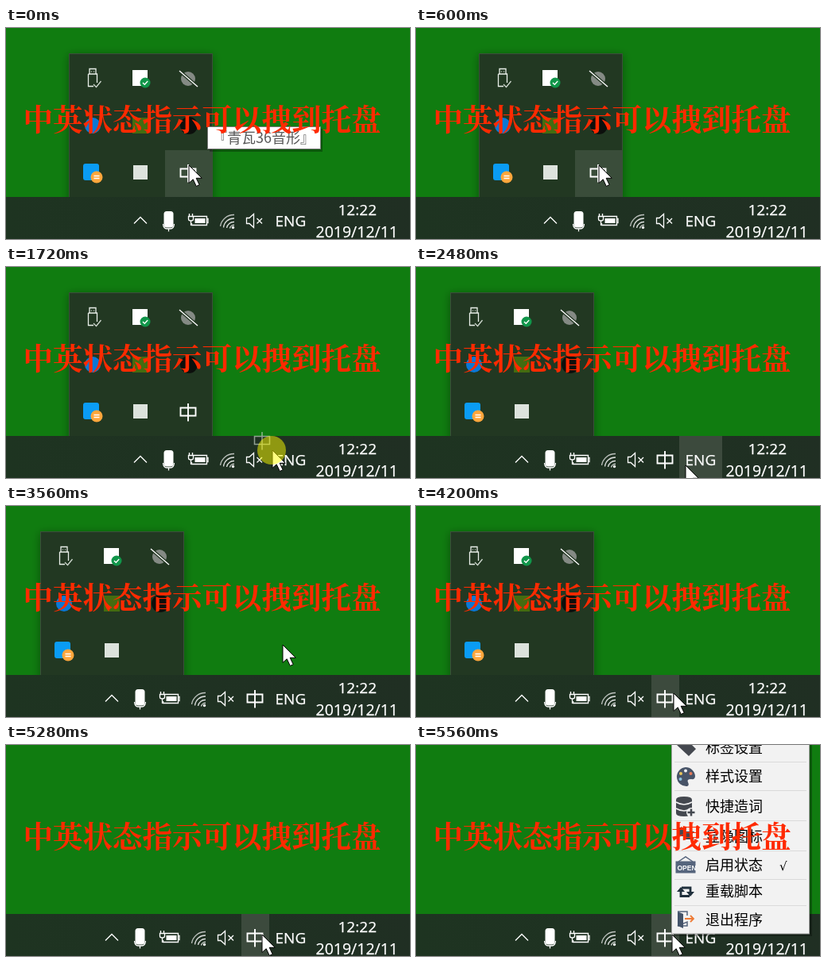
Recreate the animation shown at these times as an HTML page. Size 508 by 266 pixels, loop 6280 ms.

```html
<!DOCTYPE html>
<html lang="zh-CN">
<head>
<meta charset="utf-8">
<title>托盘状态指示</title>
<style>
html, body { margin: 0; width: 100%; height: 100%; overflow: hidden; background: #107c10; }
svg { display: block; width: 508px; height: 266px; }
.ui { font: 19.5px "Open Sans", "Noto Sans", sans-serif; fill: #fff; stroke: #fff; stroke-width: .25; }
.cjk { font: 18px "Noto Sans CJK SC", "Noto Sans CJK", sans-serif; }
.title { font: 700 37.5px "Noto Serif CJK SC", "Noto Serif SC", "Noto Sans CJK SC", "Noto Sans CJK", serif; fill: #ff2a00; }
.line { fill: none; stroke: #fff; stroke-width: 1.3; }
</style>
</head>
<body>
<svg viewBox="0 0 508 266">
  <defs>
    <path id="zhong" d="M-9.500 -5.500H9.500V4.500H-9.500ZM0 -11V11.500" fill="none"/>
    <linearGradient id="bar" x2="1" y2="0">
      <stop offset="0" stop-color="#1e3421"/>
      <stop offset="1" stop-color="#202f23"/>
    </linearGradient>
    <filter id="shadow" x="-20%" y="-20%" width="140%" height="140%">
      <feDropShadow dx="0" dy="2" stdDeviation="6" flood-opacity=".35"/>
    </filter>
    <g id="tip">
      <rect x="3" y="3" width="142" height="29" fill="#000" opacity=".3"/>
      <rect x=".5" y=".5" width="142" height="28" fill="#fff" stroke="#777"/>
      <text class="cjk" x="7" y="21" fill="#575757">『青瓦36音形』</text>
    </g>
  </defs>

  <rect width="508" height="266" fill="#107c10"/>

  <g id="panel">
    <rect x="79.5" y="32.5" width="180" height="190" fill="#243824" stroke="#3b503b" filter="url(#shadow)"/>
    <rect id="cell" x="200" y="154" width="59" height="59" fill="#3a4d3a"/>
    <!-- usb stick -->
    <g class="line">
      <path d="M105 58V51.500H113V58M103.500 58H114.500V69M103.500 58V73.500H110" stroke="#e8eee8"/>
      <path d="M107.500 54.500V55.500M110.500 54.500V55.500" stroke="#e8eee8"/>
      <path d="M110 71L113.500 74.500L119.500 67" stroke="#cfd8cf"/>
    </g>
    <rect x="159" y="53" width="19" height="20" fill="#fff"/>
    <circle cx="175" cy="69" r="6.500" fill="#11964a"/>
    <path class="line" d="M172 69L174.300 71.300L178.200 67"/>
    <circle cx="229" cy="64" r="9" fill="#848a84"/>
    <path d="M218 54L241 74" stroke="#243824" stroke-width="4"/>
    <path class="line" d="M218 54L241 74"/>
    <circle cx="109" cy="123" r="10" fill="#0a78d7"/>
    <rect x="159" y="113" width="20" height="20" fill="#446c10"/>
    <circle cx="230" cy="123" r="11" fill="#0c0f0c"/>
    <rect x="97" y="171" width="20" height="21" rx="3" fill="#0a9cf5"/>
    <circle cx="114" cy="188" r="7.500" fill="#ffa63c"/>
    <path class="line" d="M110.500 186.500H117.500M110.500 189.500H117.500"/>
    <rect x="160" y="173" width="18" height="18" fill="#dde3dd"/>
    <use id="hidden" href="#zhong" x="229" y="183" stroke="#fff" stroke-width="1.900"/>
    <path id="mark" d="M200 154V212M198 153.500H202M198 212.500H202" stroke="#107c10" stroke-width="1.600"/>
  </g>

  <rect y="213" width="508" height="53" fill="url(#bar)"/>
  <g id="hover"><rect id="hoverBox" y="213" height="53" fill="#3c4a3d"/></g>

  <g id="tray">
    <path class="line" d="M161 246.500L169 238.500L177 246.500" stroke-width="1.500"/>
    <rect x="198.500" y="231" width="12" height="20.500" rx="3.500" fill="#fff"/>
    <path class="line" d="M197.500 247Q198 253 202 253H207Q211 253 211.500 247M204.500 253V256.500"/>
    <g class="line">
      <path d="M236 237.500H252.500V248.500H233.500V246"/>
      <path d="M252.500 240.500H254V245.500H252.500"/>
      <path d="M230.500 234V237M234.500 234V237M229.500 237.500H235.500V241Q235.500 243 232.500 243T229.500 241ZM232.500 243V249"/>
      <rect x="237.500" y="240" width="13" height="6" fill="#fff" stroke="none"/>
    </g>
    <g class="line" stroke-opacity=".85">
      <path d="M269.500 250A17 17 0 0 1 287 235.500" stroke-opacity=".7"/>
      <path d="M273.500 251.500A13 13 0 0 1 287 240"/>
      <path d="M277.500 252A9 9 0 0 1 287 244.500"/>
      <path d="M281.500 252.500A5 5 0 0 1 287 248.500"/>
    </g>
    <circle cx="285.500" cy="251.500" r="1.700" fill="#fff"/>
    <path class="line" d="M302.500 239.500H306L311.500 234.500V251.500L306 246.500H302.500ZM315.500 240L322 246.500M322 240L315.500 246.500"/>
  </g>
  <use id="shown" href="#zhong" x="313" y="243" stroke="#fff" stroke-width="1.900"/>

  <g class="ui">
    <text x="338.500" y="250" style="font-size:19px">ENG</text>
    <text x="417.500" y="236" style="font-size:19px">12:22</text>
    <text x="389.500" y="264">2019/12/11</text>
  </g>

  <use id="tip1" href="#tip" x="253" y="124"/>
  <use id="tip2" href="#tip" x="321" y="209"/>

  <g id="menu">
    <rect x="324" y="-2" width="174" height="243" fill="#000" opacity=".3"/>
    <rect x="321.500" y="-2" width="173" height="240" fill="#f2f2f2" stroke="#a0a0a0"/>
    <g id="items" class="cjk" fill="#000"></g>
    <text x="457" y="158" font-family="DejaVu Sans, sans-serif" font-size="15">√</text>
    <g fill="#44484f">
      <path d="M328 -6H341L352 5L343 14L328 0Z"/>
      <path d="M339 28A12 12 0 1 0 341 52Q344 51 342 47T346 43Q351 44 351 39A12 12 0 0 0 339 28Z" fill="#485468"/>
      <circle cx="333" cy="36" r="2" fill="#e8c55a"/>
      <circle cx="339" cy="32.500" r="2" fill="#f2f2f2"/>
      <circle cx="345.500" cy="36" r="2" fill="#e57a5a"/>
      <circle cx="332.500" cy="43" r="2" fill="#8ec2e0"/>
      <path d="M327 69Q327 65 337 65T347 69V86Q347 90 337 90T327 86Z"/>
      <path d="M327 72Q337 78 347 72M327 80Q337 86 347 80" fill="none" stroke="#f2f2f2" stroke-width="1.500"/>
      <circle cx="346" cy="85" r="6" fill="#f2f2f2"/>
      <path d="M346 80.500V89.500M341.500 85H350.500" stroke="#44484f" stroke-width="2.500"/>
      <path d="M329 104H340L339 109H350L346 114L350 119H337L338 115H331V126H329Z"/>
    </g>
    <g fill="none" stroke="#56657d">
      <path d="M330 147L339 141L348 147" stroke-width="1.500"/>
      <rect x="327" y="147" width="24" height="14" fill="#56657d"/>
      <text x="328.500" y="157.500" fill="#fff" stroke="none" font-family="Liberation Sans, sans-serif" font-size="8.500" font-weight="700">OPEN</text>
      <path d="M333 185V190.500H344M345 185V180H334" stroke="#20303c" stroke-width="2.800"/>
      <path d="M328 185L333 179L338 185ZM340 185L345 191L350 185Z" fill="#20303c" stroke="none"/>
      <path d="M329 210H341V215M341 223V228H329Z" stroke="#56657d" stroke-width="1.500"/>
      <path d="M329 210L336 213V231L329 228Z" fill="#44546a" stroke="none"/>
      <path d="M338 219H349M345 215L349 219L345 223" stroke="#ee7a35" stroke-width="1.800"/>
    </g>
  </g>

  <g id="pointer">
    <use id="ghost" href="#zhong" x="-13" y="-12" stroke="#cfdccf" stroke-width="1.500" stroke-opacity=".65"/>
    <path d="M0 0V22.500L5.200 17.800L9.300 26.500L13.200 24.700L9.200 16.300H16.200Z" fill="#fff" stroke="#000"/>
    <circle id="press" cx="-1" r="18" fill="#ff0" fill-opacity=".5"/>
  </g>

  <text class="title" x="21.500" y="129">中英状态指示可以拽到托盘</text>
</svg>

<script>
const LOOP = 6280;
const $ = id => document.getElementById(id);

// [start ms, x, y] of the pointer tip
const path = [
  [0, 230, 173], [760, 237, 168], [920, 255, 178], [1080, 277, 187],
  [1240, 296, 195], [1400, 309, 207], [1560, 326, 224], [1720, 335, 231],
  [1840, 336, 236], [2000, 337, 242], [2160, 338, 250], [2480, 339, 250],
  [2640, 346, 230], [2800, 356, 165], [2960, 355, 161], [3560, 348, 175],
  [3720, 341, 201], [3880, 327, 208], [4040, 331, 226], [4200, 324, 236],
  [4320, 322, 239]
];

// [start ms, opacity] of each part
const parts = {
  panel: [[0, 1], [5280, 0]],
  cell: [[0, 1], [920, 0]],
  hidden: [[0, 1], [2480, 0]],
  shown: [[0, 0], [2480, 1]],
  mark: [[0, 0], [1080, 1], [1560, 0]],
  press: [[0, 0], [760, 1], [2320, 0]],
  ghost: [[0, 0], [920, 1], [2320, 0]],
  hover: [[0, 0], [2480, 1], [2800, 0], [4040, 1]],
  tip1: [[0, 1], [600, 0]],
  tip2: [[0, 0], [4520, .35], [4640, .7], [4800, 1], [5280, 0]],
  menu: [[0, 0], [5440, .5], [5560, 1]]
};

const labels = [
  ["标签设置", 10], ["样式设置", 46], ["快捷造词", 84], ["显隐图标", 122],
  ["启用状态", 158], ["重载脚本", 191], ["退出程序", 227]
];
$("items").innerHTML = labels.map(([name, y], i) =>
  `<text x="364" y="${y}">${name}</text>` +
  (i < 6 ? `<path d="M325 ${y + 11.5}H491" stroke="#dadada"/>` : "")).join("");

const at = (steps, t) => steps.findLast(s => s[0] <= t);
const move = (id, x, y) => $(id).setAttribute("transform", `translate(${x} ${y})`);

function draw(t) {
  for (const id in parts) $(id).style.opacity = at(parts[id], t)[1];
  const [, x, y] = at(path, t);
  move("pointer", x, y);
  const shift = t < 2480 ? 0 : -36;
  move("panel", shift, 0);
  move("tray", shift, 0);
  const [left, width] = t < 4040 ? [331, 54] : [296, 35];
  $("hoverBox").setAttribute("x", left);
  $("hoverBox").setAttribute("width", width);
}

const start = performance.now();
function tick() {
  draw((performance.now() - start) % LOOP);
  requestAnimationFrame(tick);
}
tick();
</script>
</body>
</html>
```
